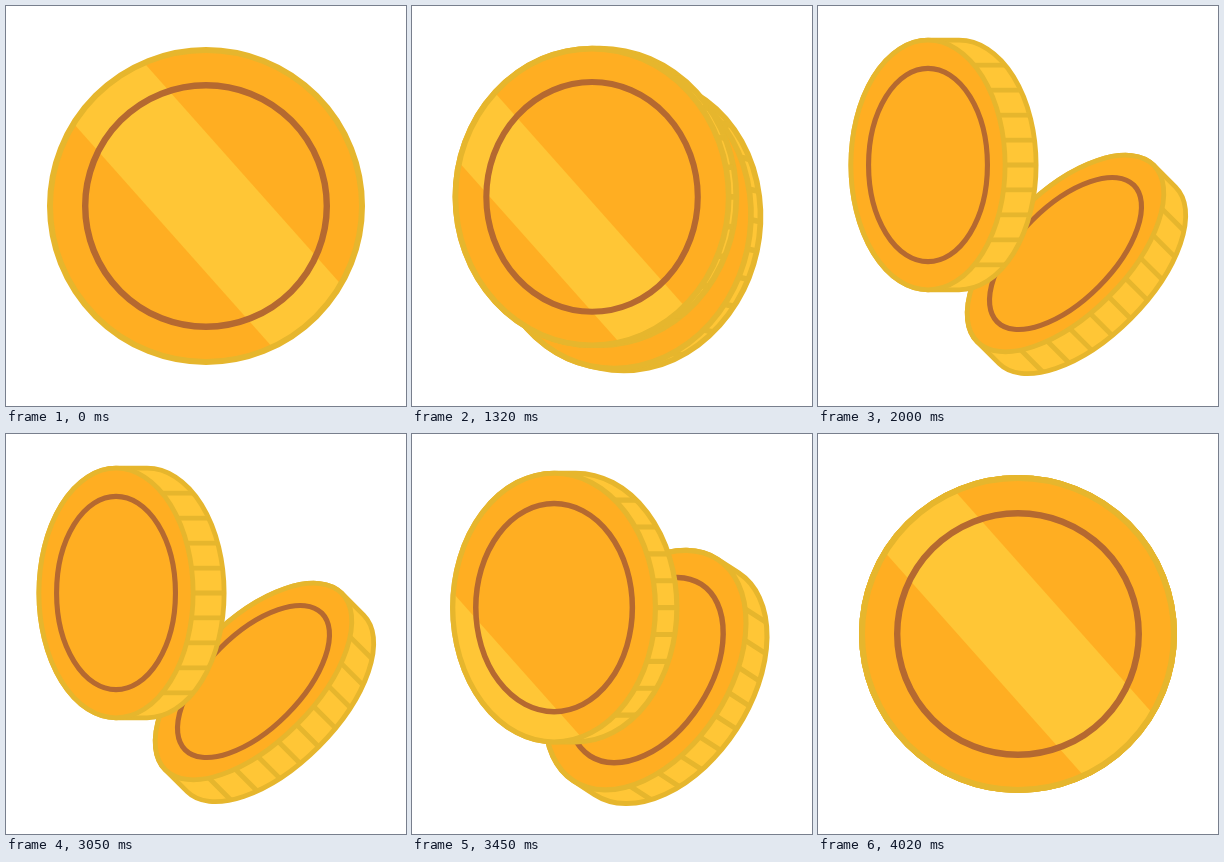
An HTML page with a canvas for the animation above (4.05 s loop, 400 by 400 pixels).

```html
<!DOCTYPE html>
<html lang="en">
<head>
<meta charset="utf-8">
<title>Coins</title>
<style>
  html, body { margin: 0; width: 100%; height: 100%; overflow: hidden; background: #fff; }
  canvas { display: block; width: 100%; height: 100%; }
</style>
</head>
<body>
<canvas id="stage" width="400" height="400"></canvas>
<script>
const ctx = document.getElementById('stage').getContext('2d');
const LOOP = 4050;
const RADIUS = 159, RING = 124, DEPTH = 31;
const GOLD = '#ffae22', LIGHT = '#ffc636', RIM = '#e6b62d', BROWN = '#b56930';
const SHINE_SLOPE = 1.125;

const clamp = v => Math.min(1, Math.max(0, v));
const mix = (a, b, k) => a + (b - a) * k;

// Cubic bezier (.42, 0, .58, 1), solved for x by bisection
function ease(x) {
  if (x <= 0 || x >= 1) return clamp(x);
  let low = 0, high = 1;
  for (let i = 0; i < 24; i++) {
    const s = (low + high) / 2, r = 1 - s;
    if (1.26 * s * r * r + 1.74 * s * s * r + s * s * s < x) low = s; else high = s;
  }
  return low * low * (3 - 2 * low);
}

// 0 = single coin, 1 = both coins apart
function progress(t) {
  return t < 2500 ? clamp((t - 995) / 1000) : 1 - clamp((t - 3040) / 990);
}

function strokeEllipse(coin, radius, color, width) {
  ctx.beginPath();
  ctx.ellipse(coin.x, coin.y, radius * coin.sx - width / 2, radius * coin.sy - width / 2,
    coin.turn, 0, 2 * Math.PI);
  ctx.strokeStyle = color;
  ctx.lineWidth = width;
  ctx.stroke();
}

// The coin is extruded along its own short axis
function drawEdge({ x, y, turn, depth }, rx, ry, width) {
  const quarter = Math.PI / 2;
  ctx.save();
  ctx.translate(x, y);
  ctx.rotate(turn);

  ctx.beginPath();
  ctx.ellipse(0, 0, rx, ry, 0, quarter, 3 * quarter);
  ctx.ellipse(depth, 0, rx, ry, 0, 3 * quarter, 5 * quarter);
  ctx.closePath();
  ctx.fillStyle = LIGHT;
  ctx.fill();
  ctx.strokeStyle = RIM;
  ctx.lineWidth = width;
  ctx.stroke();

  ctx.beginPath();
  for (let k = -4; k <= 4; k++) {
    const side = k / 5, start = rx * Math.sqrt(1 - side * side);
    ctx.moveTo(start, ry * side);
    ctx.lineTo(start + depth, ry * side);
  }
  ctx.stroke();
  ctx.restore();
}

function drawShine(coin, { top, height }) {
  const reach = 200, rise = reach * SHINE_SLOPE;
  ctx.save();
  ctx.clip();
  ctx.translate(coin.x, coin.y);
  ctx.beginPath();
  ctx.moveTo(-reach, top - rise);
  ctx.lineTo(reach, top + rise);
  ctx.lineTo(reach, top + height + rise);
  ctx.lineTo(-reach, top + height - rise);
  ctx.fillStyle = LIGHT;
  ctx.fill();
  ctx.restore();
}

function drawCoin(coin) {
  const width = 6 * coin.sy;
  const rx = RADIUS * coin.sx - width / 2, ry = RADIUS * coin.sy - width / 2;
  if (coin.depth > 0) drawEdge(coin, rx, ry, width);
  ctx.beginPath();
  ctx.ellipse(coin.x, coin.y, rx, ry, coin.turn, 0, 2 * Math.PI);
  ctx.fillStyle = GOLD;
  ctx.fill();
  if (coin.shine) drawShine(coin, coin.shine);
  strokeEllipse(coin, RADIUS, RIM, width);
  strokeEllipse(coin, RING, BROWN, 6.4 * coin.sy);
}

function drawBackCoin(u) {
  const move = ease(u / 0.91), squash = ease(u / 0.88);
  const bend = 24 * move * (1 - move) ** 2;
  drawCoin({
    x: mix(200, 247.5, move) - bend, y: mix(200, 247.5, move) + bend,
    sx: mix(1, 0.4, squash), sy: mix(1, 0.8, squash),
    turn: move * Math.PI / 4, depth: DEPTH * ease(u / 0.84)
  });
}

function drawFrontCoin(u) {
  const move = ease(u), squash = ease(u / 0.95);
  drawCoin({
    x: mix(200, 110, move), y: mix(200, 159, move),
    sx: mix(1, 0.5, squash), sy: mix(1, 0.8, squash),
    turn: 0, depth: DEPTH * squash,
    shine: { top: -73.5 + 282 * mix(move, u, 0.55), height: 105 + 35 * (1 - move) ** 8 }
  });
}

function draw(t) {
  const u = progress(t);
  ctx.clearRect(0, 0, 400, 400);
  if (u > 0) drawBackCoin(u);
  drawFrontCoin(u);
}

function tick() {
  draw(performance.now() % LOOP);
  requestAnimationFrame(tick);
}
tick();
</script>
</body>
</html>
```
